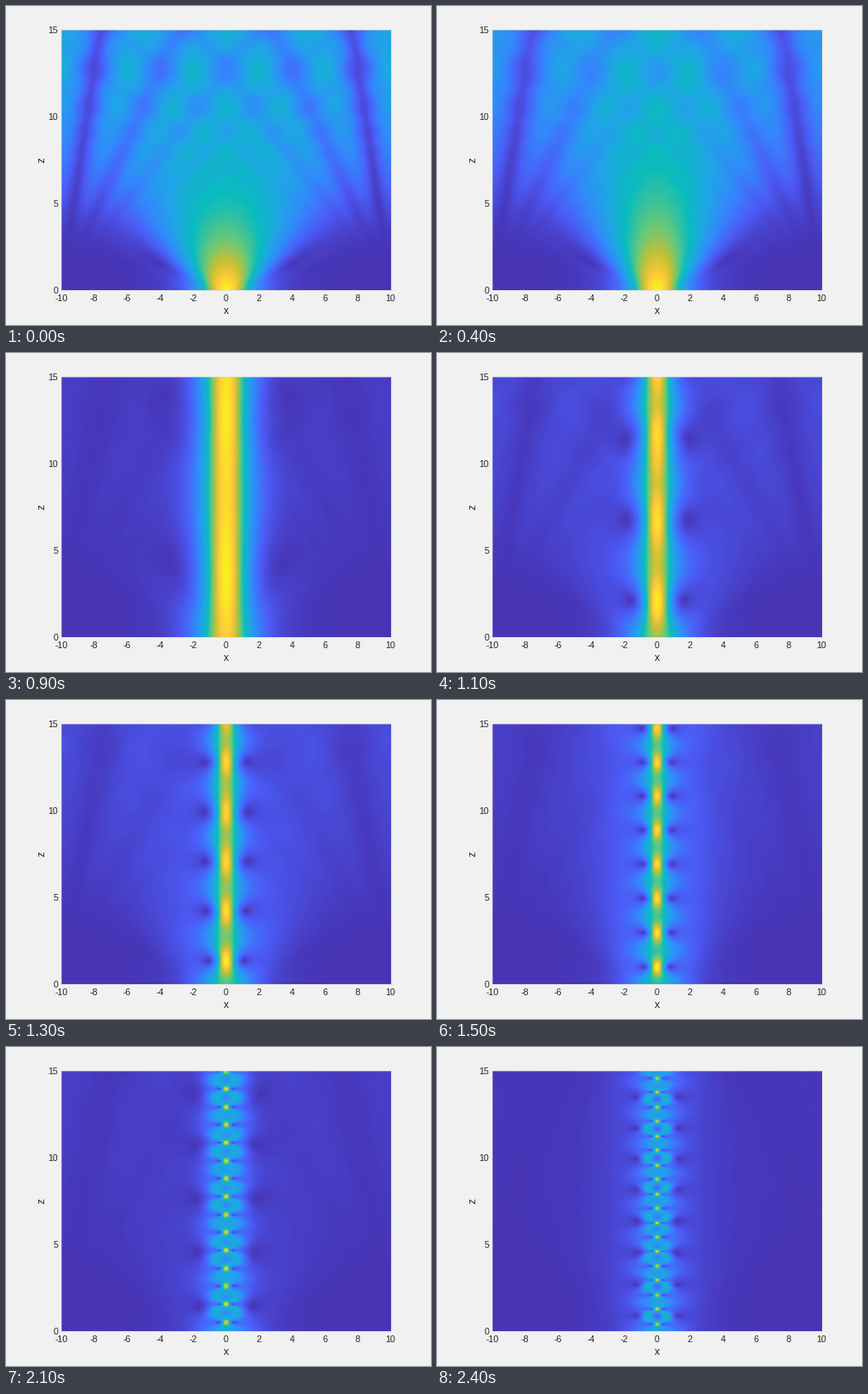
These frames come from a looping animation (500x375 px, 2.5 s). A matplotlib script:

```python
import numpy as np
import matplotlib.pyplot as plt
from matplotlib.animation import FuncAnimation
from matplotlib.colors import LinearSegmentedColormap

FRAMES, INTERVAL = 25, 100
LENGTH, NX = 20.0, 256
Z_MAX, ROWS, SUBSTEPS = 15.0, 300, 15
INK = "#262626"

# Evenly spaced from violet through teal to yellow
RAMP = ["#4735b6", "#4c5cf6", "#3486fc", "#20a5e6", "#0abcbe",
        "#62c87e", "#c8c034", "#feca3a", "#f8f01e"]


def propagate(orders):
    """Split-step solution of i u_z + u_xx / 2 + N^2 |u|^2 u = 0, u(0) = sech x."""
    x = (np.arange(NX) / NX - 0.5) * LENGTH
    k = 2 * np.pi * np.fft.fftfreq(NX, LENGTH / NX)
    dz = Z_MAX / (ROWS * SUBSTEPS)
    drift = np.exp(-0.5j * k**2 * dz)
    kick = 0.5j * dz * orders[:, None] ** 2

    u = np.tile(1 / np.cosh(x), (len(orders), 1)).astype(complex)
    field = np.empty((len(orders), ROWS + 1, NX + 1))
    for row in range(ROWS + 1):
        field[:, row, :NX] = np.abs(u)
        if row == ROWS:
            break
        for _ in range(SUBSTEPS):
            u *= np.exp(kick * np.abs(u) ** 2)
            u = np.fft.ifft(np.fft.fft(u, axis=1) * drift, axis=1)
            u *= np.exp(kick * np.abs(u) ** 2)
    field[:, :, NX] = field[:, :, 0]
    return field


field = propagate(0.12 * np.arange(FRAMES))

plt.rcParams["font.family"] = "Liberation Sans"
fig = plt.figure(figsize=(5, 3.75), dpi=100, facecolor="#f1f1f1")
ax = fig.add_axes([0.13, 0.11, 0.775, 0.815])

hx, hz = LENGTH / NX / 2, Z_MAX / ROWS / 2
image = ax.imshow(
    field[0], origin="lower", aspect="auto", interpolation="bilinear",
    cmap=LinearSegmentedColormap.from_list("ramp", RAMP),
    extent=(-10 - hx, 10 + hx, -hz, Z_MAX + hz),
)
ax.set(xlim=(-10, 10), ylim=(0, Z_MAX))

ticks = range(-10, 11, 2)
ax.set_xticks(ticks, [str(t) for t in ticks])
ax.set_yticks(range(0, 16, 5))
ax.tick_params(length=0, labelsize=7.7, labelcolor=INK)
ax.tick_params(axis="x", pad=4.1)
ax.tick_params(axis="y", pad=2.6)
for spine in ax.spines.values():
    spine.set(linewidth=0.72, color="#d0d0d0", alpha=0.5)

label = dict(ha="center", va="center", fontsize=9, color=INK)
fig.text(259 / 500, 1 - 359 / 375, "x", **label)
fig.text(43 / 500, 1 - 181 / 375, "z", rotation=90, **label)


def draw(i):
    image.set_data(field[i])
    image.set_clim(field[i].min(), field[i].max())
    return [image]


anim = FuncAnimation(fig, draw, frames=FRAMES, interval=INTERVAL,
                     repeat=True, repeat_delay=0)
plt.show()
```
